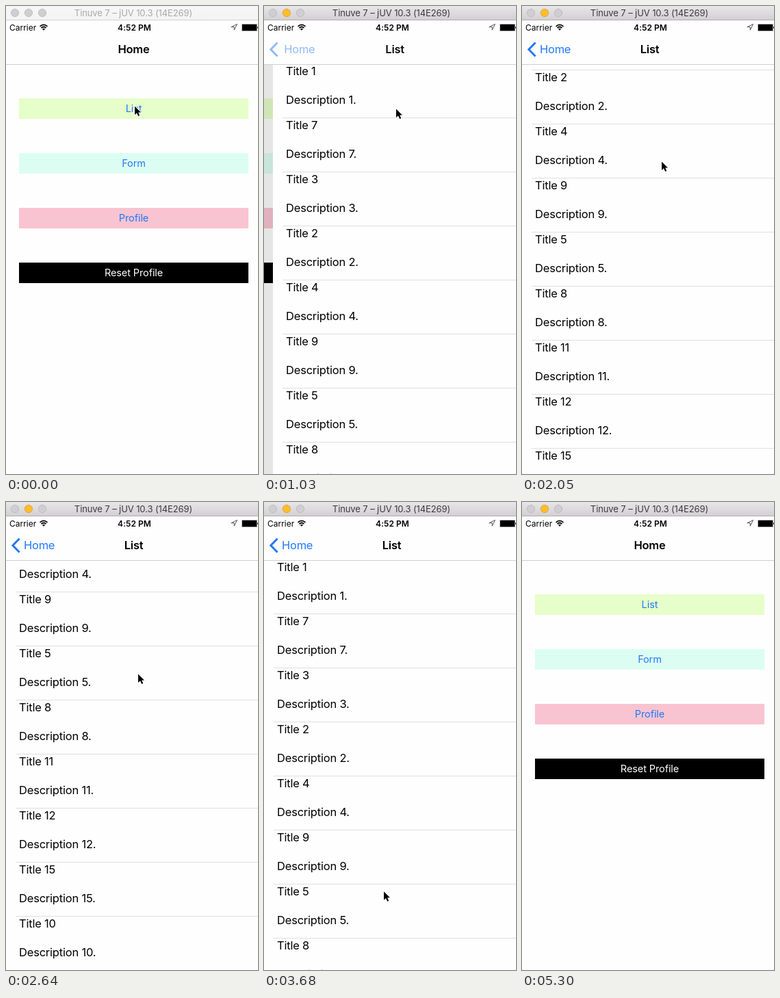
These frames come from a looping animation (368 px wide and 684 px high, 5450 ms). An HTML page with a canvas:

```html
<!DOCTYPE html>
<html lang="en">
<head>
<meta charset="utf-8">
<title>Navigation demo</title>
<style>
  html, body { margin: 0; width: 100%; height: 100%; overflow: hidden; background: #fefefe; }
  canvas { display: block; width: 368px; height: 684px; }
</style>
</head>
<body>
<canvas id="stage"></canvas>
<script>
const W = 368, H = 684, MID = 186.5, BLUE = '#2179fb', PAPER = '#fefefe';
const canvas = document.getElementById('stage');
const ctx = canvas.getContext('2d');
const ratio = window.devicePixelRatio || 1;
canvas.width = W * ratio;
canvas.height = H * ratio;

const LOOP = 5450, STEPS = 37, LEAD = 16;
const PUSH = 5, DRAG_UP = 11, FLING = 14, DRAG_DOWN = 20, RELEASE = 22, PRESS_BACK = 30, POP = 30.9;

const ROWS = [1, 7, 3, 2, 4, 9, 5, 8, 11, 12, 15, 10, 14, 13, 6];
const BUTTONS = [['List', '#e6fec9'], ['Form', '#dcfef2'], ['Profile', '#f9c4d1'], ['Reset Profile', '#000']];

// Where the pointer pauses or turns.
const POINTER = [
  { at: 0, x: 187, y: 145 },
  { at: 3, x: 192, y: 149 },
  { at: 8, x: 192, y: 149 },
  { at: DRAG_UP, x: 200, y: 454 },
  { at: FLING, x: 203, y: 226 },
  { at: 18, x: 192, y: 250 },
  { at: DRAG_DOWN, x: 193, y: 254 },
  { at: RELEASE, x: 202, y: 683 },
  { at: 24, x: 202, y: 690 },
  { at: 29, x: 62, y: 79 },
  { at: 32, x: 62, y: 79 },
  { at: 36, x: -30, y: 260 }
];

const decay = (elapsed, rate) => Math.exp(-rate * Math.max(0, elapsed));
const clamp = v => Math.max(0, Math.min(1, v));

function pointerAt(step) {
  const i = Math.max(1, POINTER.findIndex(p => p.at >= step));
  const a = POINTER[i - 1], b = POINTER[i];
  const part = (step - a.at) / (b.at - a.at);
  return { x: a.x + (b.x - a.x) * part, y: a.y + (b.y - a.y) * part };
}

// Dragging follows the pointer, a fling slows down, an overscroll springs back.
function scrollAt(step) {
  if (step < DRAG_UP) return 0;
  const dragged = from => pointerAt(from).y - pointerAt(step).y;
  if (step <= FLING) return dragged(DRAG_UP);
  if (step <= DRAG_DOWN) return scrollAt(FLING) + 157 * (1 - decay(step - FLING, 0.36));
  if (step > RELEASE) return scrollAt(RELEASE) * decay(step - RELEASE, 1.2);
  const offset = scrollAt(DRAG_DOWN) + dragged(DRAG_DOWN);
  return offset < 0 ? offset * 0.29 : offset;
}

function slideAt(step) {
  const open = decay(step - PUSH, 1.67), close = decay(step - POP, 1.67);
  return W * (step < POP ? open : 1 - close);
}

function rect(x, y, w, h, color) {
  ctx.fillStyle = color;
  ctx.fillRect(x, y, w, h);
}

function text(label, x, y, size, { color = '#000', weight = 400, align = 'left', spacing = -0.2, alpha = 1 } = {}) {
  ctx.globalAlpha = clamp(alpha);
  ctx.font = `${weight} ${size}px Inter, "Liberation Sans", sans-serif`;
  ctx.letterSpacing = spacing + 'px';
  ctx.textAlign = align;
  ctx.fillStyle = color;
  ctx.fillText(label, x, y);
  ctx.globalAlpha = 1;
}

function shape(d, { x = 0, y = 0, fill, stroke, width = 1, alpha = 1 }) {
  const path = new Path2D(d);
  ctx.save();
  ctx.translate(x, y);
  ctx.globalAlpha = alpha;
  ctx.lineWidth = width;
  if (stroke) { ctx.strokeStyle = stroke; ctx.stroke(path); }
  if (fill) { ctx.fillStyle = fill; ctx.fill(path); }
  ctx.restore();
}

function drawHome(shown, pressed) {
  ctx.save();
  ctx.translate(-0.3 * W * shown, 0);
  BUTTONS.forEach(([label, fill], i) => {
    const y = 135 + 80 * i;
    const color = fill === '#000' ? '#fff' : BLUE;
    rect(19, y, 335, 30, fill);
    text(label, MID, y + 20.3, 14.5, { color, align: 'center', spacing: -0.1, alpha: pressed && i === 0 ? 0.3 : 1 });
  });
  ctx.restore();
  rect(0, 86, W, H, `rgba(0,0,0,${0.1 * shown})`);
}

function drawList(left, scroll) {
  ctx.save();
  ctx.translate(Math.round(left), -Math.round(scroll));
  rect(0, 0, W, 2 * H, PAPER);
  ROWS.forEach((n, i) => {
    const y = 79 * i;
    text(`Title ${n}`, 19, y + 101, 16.5);
    text(`Description ${n}.`, 19, y + 143, 16.5);
    rect(14, y + 163, W, 1, '#dfdfe0');
  });
  ctx.restore();
}

function drawNavBar(left, shown, pressed) {
  rect(0, 21, W, 64, PAPER);
  rect(0, 85, W, 1, '#d0d0d1');
  const title = { weight: 600, align: 'center', spacing: -0.25 };
  text('Home', MID - 138 * shown, 69, 16.5, { ...title, alpha: 1 - 2 * shown });
  text('List', MID + 0.35 * left, 69, 16.5, { ...title, alpha: shown });
  const alpha = pressed ? 0.25 : clamp(1 - left / 26);
  shape('M19.6 53.5L9.9 63.5L19.6 73.5', { stroke: BLUE, width: 3, alpha });
  text('Home', 26 + 0.25 * left, 69, 16.5, { color: BLUE, spacing: -0.25, alpha });
}

function drawStatusBar() {
  text('Carrier', 5, 35.5, 12, { spacing: 0 });
  text('4:52 PM', 187.5, 35.5, 12, { weight: 600, align: 'center', spacing: 0.05 });
  shape('M49.5 29.8Q55 25 60.5 29.8M51.5 32Q55 29 58.5 32', { stroke: '#000', width: 1.7 });
  shape('M52.9 33.5Q55 31.9 57.1 33.5L55 35.8Z', { fill: '#000' });
  shape('M337.5 26.5L328.8 30.7H333.2V35.2Z', { stroke: '#555' });
  shape('M344.5 26.5H366.5V36.5H344.5Z', { stroke: '#aaa' });
  rect(345, 27, 21, 9, '#000');
  rect(367, 30, 1, 3, '#333');
}

function drawTitleBar(active) {
  const shade = ctx.createLinearGradient(0, 0, 0, 20);
  shade.addColorStop(0, active ? '#e8e6e8' : '#f6f6f6');
  shade.addColorStop(1, active ? '#d2d0d2' : '#f4f4f4');
  rect(0, 0, W, 20, shade);
  rect(0, 20, W, 1, active ? '#b2b0b2' : '#d2d2d2');
  for (let i = 0; i < 3; i++) {
    const lit = active && i === 1;
    ctx.beginPath();
    ctx.arc(13 + 20 * i, 10, 5.6, 0, 2 * Math.PI);
    ctx.fillStyle = lit ? '#fdbd2e' : '#d0ced0';
    ctx.strokeStyle = lit ? '#dfa023' : '#b9b7b9';
    ctx.lineWidth = 0.8;
    ctx.fill();
    ctx.stroke();
  }
  text('Tinuve 7 – jUV 10.3 (14E269)', 186, 15, 13,
    { color: active ? '#3c3b3c' : '#a9a9a9', align: 'center', spacing: -0.1 });
}

function drawPointer({ x, y }) {
  shape('M1 1.5V14L4 11.3L6.2 16L8.2 15.1L6.2 10.5H10Z', { x, y, fill: '#000', stroke: '#fff', width: 2 });
}

function draw(step) {
  const left = slideAt(step), shown = 1 - left / W;
  ctx.setTransform(ratio, 0, 0, ratio, 0, 0);
  rect(0, 0, W, H, PAPER);
  drawHome(shown, step === PUSH);
  drawList(left, scrollAt(step));
  drawNavBar(left, shown, step === PRESS_BACK);
  drawStatusBar();
  drawTitleBar(step >= PUSH);
  drawPointer(pointerAt(step));
}

function tick() {
  const time = performance.now() % LOOP;
  draw(Math.min(STEPS - 1, Math.floor((time + LEAD) * STEPS / LOOP)));
  requestAnimationFrame(tick);
}
tick();
</script>
</body>
</html>
```
